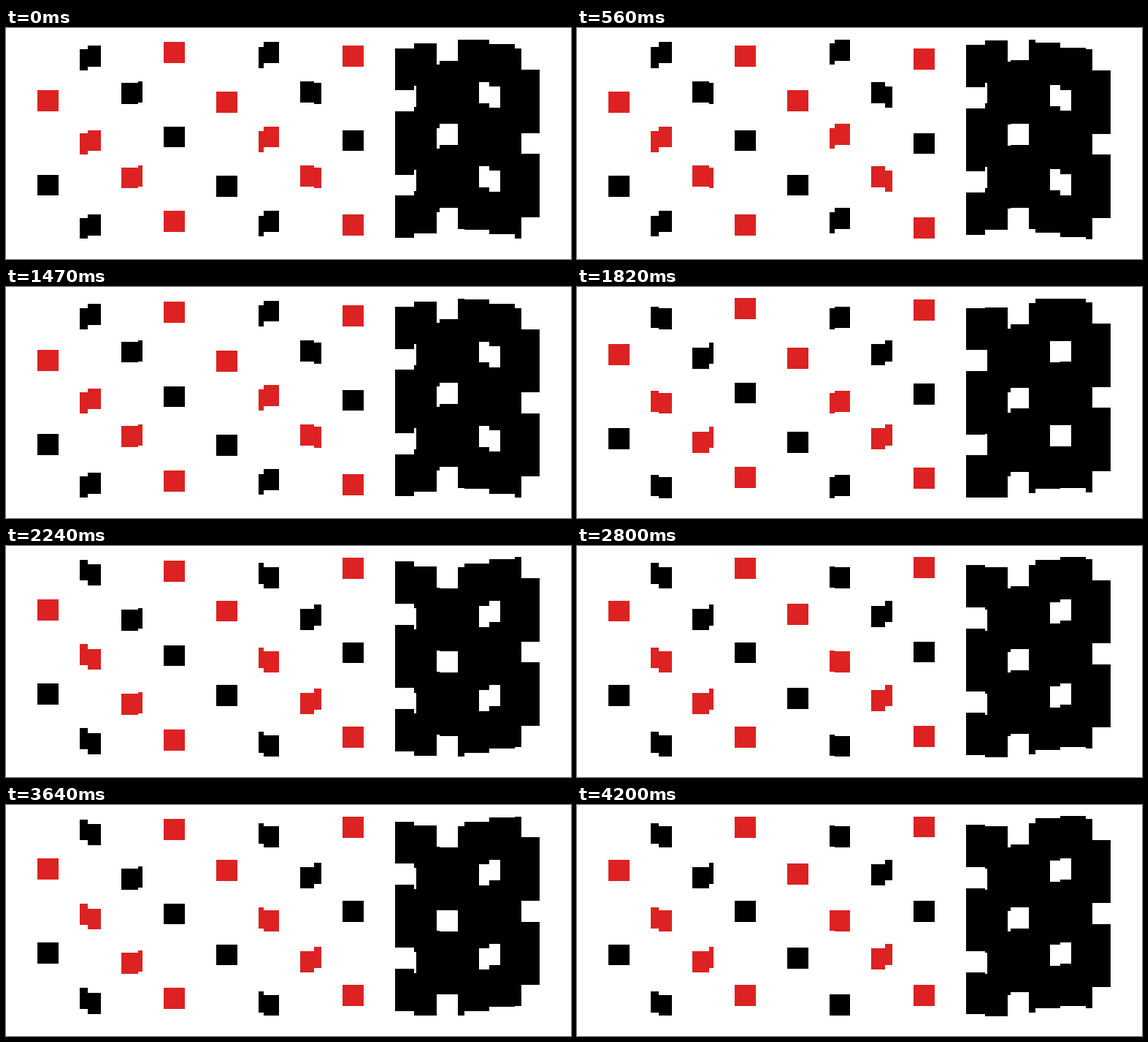
Animation of 774x316 px, one loop 4270 ms. Source, as an HTML page with a canvas:

```html
<!DOCTYPE html>
<html lang="en">
<head>
<meta charset="utf-8">
<title>Sliced wave</title>
<style>
  html, body { margin: 0; width: 100%; height: 100%; overflow: hidden; background: #fff; }
  canvas { display: block; }
</style>
</head>
<body>
<canvas id="stage" width="774" height="316"></canvas>
<script>
const ctx = document.getElementById('stage').getContext('2d');

const LOOP = 4270, STEP = 70;
const CELL = 28.8, COLS = 7, ROWS = 9;
const LEFT = 43.2, TILE = CELL * 8.5;
const SLICES = 20, SLICE_WIDTH = 34.4;
const MIDDLE = 22.4, SWING = 7.1;
const RED = '#dc2222', BLACK = '#000';

// The wave advances one radian per step, apart from steps it sits out
// for good (holds) or catches up on right after (stalls).
const holds = [7, 17, 30, 39, 57];
const stalls = [15, 59];

function waveTick(time) {
  const step = Math.floor((time % LOOP) / STEP);
  const held = holds.filter(h => h <= step).length;
  return step - held - (stalls.includes(step) ? 1 : 0);
}

// Two tiles show coloured dots, the third is solid with the dots cut out.
function cellColor(tile, col, row) {
  const isDot = col % 2 === 0 && (row + col) % 4 === 2;
  if (tile === 2) return isDot ? null : BLACK;
  if (!isDot) return null;
  return (row - col + 8) % 8 === 2 ? RED : BLACK;
}

const cells = [];
for (let tile = 0; tile < 3; tile++)
  for (let col = 0; col < COLS; col++)
    for (let row = 0; row < ROWS; row++) {
      const color = cellColor(tile, col, row);
      const x = LEFT + tile * TILE + col * CELL;
      if (color) cells.push({ x, row, color });
    }

function drawSlice(index, top) {
  const start = Math.round(LEFT + index * SLICE_WIDTH);
  const end = Math.round(LEFT + (index + 1) * SLICE_WIDTH);
  for (const { x, row, color } of cells) {
    const x1 = Math.max(start, Math.round(x));
    const x2 = Math.min(end, Math.round(x + CELL));
    if (x2 <= x1) continue;
    const y1 = Math.round(top + row * CELL);
    const y2 = Math.round(top + (row + 1) * CELL);
    ctx.fillStyle = color;
    ctx.fillRect(x1, y1, x2 - x1, y2 - y1);
  }
}

function draw(time) {
  const tick = waveTick(time);
  ctx.fillStyle = '#fff';
  ctx.fillRect(0, 0, 774, 316);
  for (let i = 0; i < SLICES; i++)
    drawSlice(i, MIDDLE + SWING * Math.cos(i + tick - 7));
}

function loop() {
  draw(performance.now());
  requestAnimationFrame(loop);
}
loop();
</script>
</body>
</html>
```
